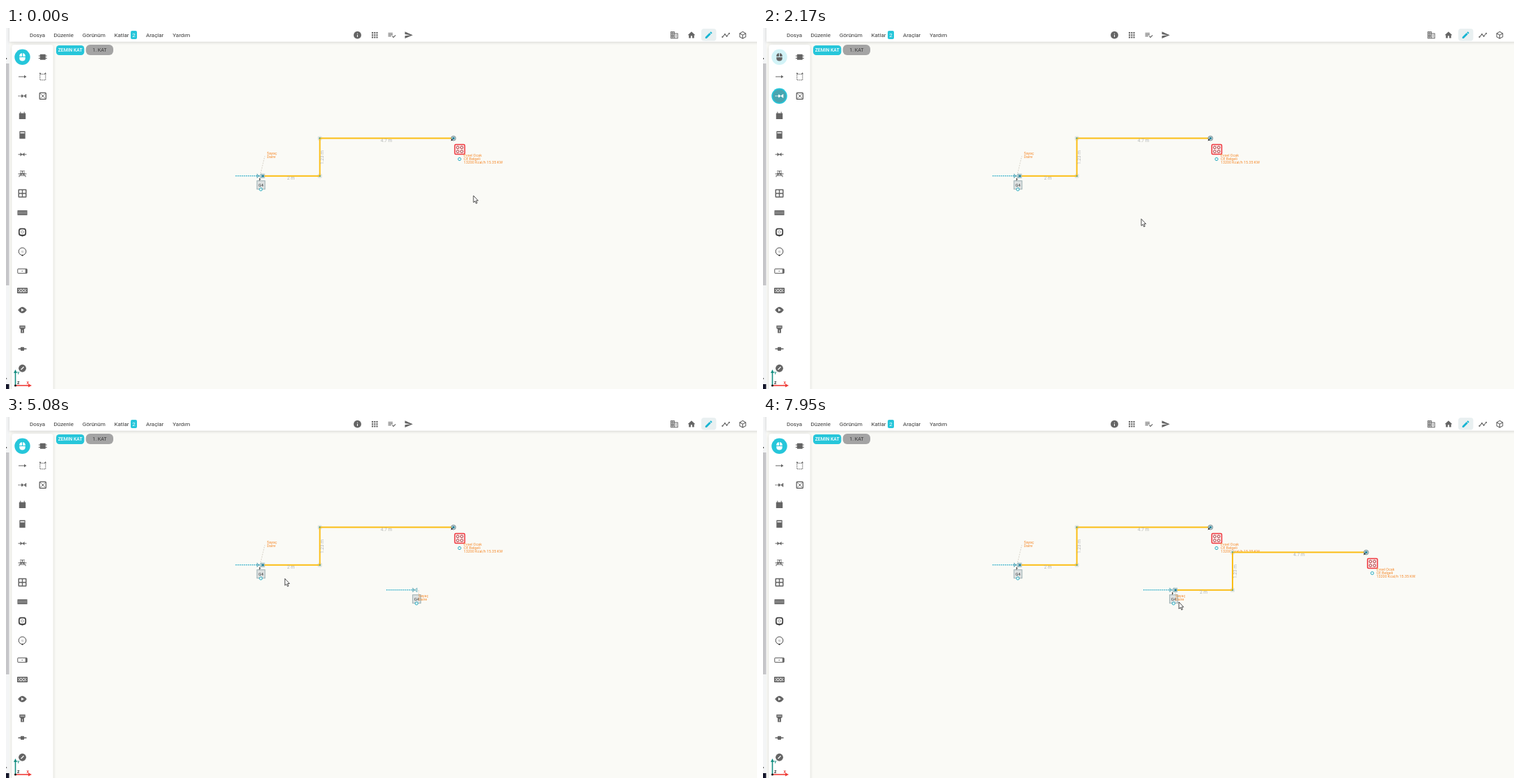
Write an HTML page that moves like this. It is 1078 px wide and 519 px high and loops after 8 s.

```html
<!DOCTYPE html>
<html lang="tr">
<head>
<meta charset="utf-8">
<title>Tesisat</title>
<style>
html, body { margin: 0; width: 100%; height: 100%; overflow: hidden; background: #fafaf6; }
svg { display: block; width: 100%; height: 100%; font-family: Roboto, sans-serif; }
.ui { fill: #383838; font-size: 8px; }
.icon { fill: #656565; color: #656565; }
.line { fill: none; stroke: currentColor; stroke-width: 1; }
.hole { fill: #fff; }
.note { fill: #f58a2c; font-size: 5.35px; }
.size { fill: #b2b5b5; font-size: 6.5px; text-anchor: middle; }
.dots { stroke: #18a5c4; stroke-width: 1.2; stroke-dasharray: 1.7 1.2; }
.ring { fill: #eafafa; stroke: #2cabc0; stroke-width: 1; }
.menu { fill: #222; font: 6.8px "Open Sans", sans-serif; }
</style>
</head>
<body>
<svg id="stage" viewBox="0 0 1078 519">
  <defs>
    <filter id="shadow" x="-20%" y="-20%" width="140%" height="140%">
      <feDropShadow dx="0" dy="1" stdDeviation="2.2" flood-opacity=".17"/>
    </filter>
    <filter id="menuShadow" x="-10%" y="-10%" width="125%" height="130%">
      <feDropShadow dx="1.5" dy="1.5" stdDeviation="1" flood-opacity=".4"/>
    </filter>
  </defs>
</svg>
<script>
const CYAN = '#26c6da', GREY = '#656565';
const stage = document.getElementById('stage');
const at = (x, y, body, extra = '') => `<g transform="translate(${x} ${y})" ${extra}>${body}</g>`;
const text = (x, y, body, cls = 'ui', extra = '') => `<text x="${x}" y="${y}" class="${cls}" ${extra}>${body}</text>`;
const rect = (x, y, w, h, extra = '') => `<rect x="${x}" y="${y}" width="${w}" height="${h}" ${extra}/>`;
const circle = (x, y, r, extra = '') => `<circle cx="${x}" cy="${y}" r="${r}" ${extra}/>`;
const path = (d, extra = '') => `<path d="${d}" ${extra}/>`;
const line = (d, extra = '') => path(d, `class="line" ${extra}`);
const grid = (steps, draw) => steps.flatMap(y => steps.map(x => draw(x, y))).join('');

// Icons on a 24 unit square, shown 13 px wide
const glyph = (x, y, body) =>
  `<g class="icon" transform="translate(${x - 6.5} ${y - 6.5}) scale(.54)">${body}</g>`;

const header =
  rect(5, -6, 1080, 25.5, 'fill="#fff" filter="url(#shadow)"') +
  [[34, 'Dosya'], [68.5, 'Düzenle'], [109.7, 'Görünüm'], [155.5, 'Katlar'], [201, 'Araçlar'], [239.3, 'Yardım']]
    .map(([x, label]) => text(x, 12.6, label)).join('') +
  rect(179, 4, 9, 12, `rx="2" fill="${CYAN}"`) +
  text(183.5, 12.8, '2', 'ui', 'style="fill:#fff" text-anchor="middle"') +
  rect(998, 1, 21.5, 17.5, 'rx="4" fill="#e9f0f1"') +
  glyph(504.5, 10.2, path('M12 2a10 10 0 1 0 .01 0zM11 7h2v2h-2zm0 4h2v6h-2z', 'fill-rule="evenodd"')) +
  glyph(529.3, 10.2, grid([4, 10, 16], (x, y) => rect(x, y, 4, 4))) +
  glyph(554, 10.2, path('M2 6h12v2H2zM2 10h12v2H2zM2 14h8v2H2zM21 11.5l1.5 1.5-6.5 6.5-4-4 1.5-1.5 2.5 2.5z')) +
  glyph(578, 10.2, path('M2 21L23 12 2 3v7l15 2-15 2z')) +
  glyph(959.3, 10.2, line('M3 20.5V3.5h9v17zM12 8h9v12.5H3M3 7.5h9M3 12h9M3 16h9M7.5 3v17M15 12h3M15 16h3', 'style="stroke-width:1.9"')) +
  glyph(984, 10.2, path('M10 20v-6h4v6h5v-8h3L12 3 2 12h3v8z')) +
  glyph(1008.7, 10.2, path('M3 17.3V21h3.8L17.8 9.9l-3.7-3.7zM20.7 7q.6-.7 0-1.4l-2.3-2.3q-.7-.6-1.4 0l-1.9 1.8 3.8 3.8z', 'fill="#16b5d2"')) +
  glyph(1033.3, 10.2, line('M3 17l6.5-7 5 5L21 7.5', 'style="stroke-width:2"') +
    [[3, 17], [9.5, 10], [14.5, 15], [21, 7.5]].map(([x, y]) => circle(x, y, 2)).join('')) +
  glyph(1057.5, 10.2, line('M12 3l8 4.5v9L12 21l-8-4.5v-9zM4 7.5l8 4.5 8-4.5M12 12v9', 'style="stroke-width:2"'));

const chips =
  rect(72, 25, 40.3, 14, `rx="4.5" fill="${CYAN}"`) +
  text(92.2, 34.2, 'ZEMIN KAT', 'ui', 'style="fill:#fff;font-size:6.8px;font-weight:500" text-anchor="middle"') +
  rect(114.7, 24, 39.3, 15, 'rx="6" fill="#a4a4a4"') +
  text(134.4, 34.2, '1. KAT', 'ui', 'style="font-size:7px" text-anchor="middle"');

const bowTie = 'M-3 -2.7L3 2.7V-2.7L-3 2.7z';
const mouseIcon = path('M-.5 -5.6V-.7H-4.2V-2Q-4 -5.2 -.5 -5.6zM.5 -5.6V-.7H4.2V-2Q4 -5.2 .5 -5.6zM-4.2 .3H4.2V2Q4 5.8 0 5.8T-4.2 2z');
const branchIcon = line('M-6 0h2.2M-3 0h2') + at(2, 0, path(bowTie)) + line('M5.3 -2.6v5.2M-1.2 -1.5v3');
const tools = [
  line('M-5.5 0H4') + path('M2.5 -2.2L6 0 2.5 2.2z'),
  '',
  path('M-4.7 -3.5h1.5v-2h1v2h4.4v-2h1v2h1.5V5H-4.7z'),
  rect(-4.2, -5.5, 8.4, 11, 'rx=".6"') + rect(-3, -4, 6, 1.6, 'class="hole"'),
  line('M-6 0H6') + path(bowTie),
  line('M-6 0H6M0 0v-4M-3.5 -4h7M-4.5 4.5v-2.2h9v2.2') + path(bowTie),
  rect(-6, -6, 12, 12, 'rx="1"') + grid([-4.5, .7], (x, y) => rect(x, y, 3.8, 3.8, 'rx=".5" class="hole"')),
  rect(-7, -3.5, 14, 7) + line('M-5 -2v4M-3 -2v4M-1 -2v4M1 -2v4M3 -2v4M5 -2v4', 'style="stroke:#bbb;stroke-width:.7"'),
  rect(-4.7, -5, 9.4, 9.4, 'rx="3" fill="none" stroke="#444" stroke-width="1.8"') +
    circle(0, -.3, 1.8, 'fill="none" stroke="#666" stroke-width=".7"') + rect(-1.2, 4, 2.4, 2, 'fill="#444"'),
  circle(0, -.3, 5.3, 'fill="none" stroke="#444" stroke-width="1"') +
    text(0, 1.2, 'G', '', 'font-size="4" text-anchor="middle"') + circle(0, 5.4, 1.1, 'fill="#444"'),
  rect(-6.7, -3.2, 13.4, 6.4, 'rx=".7" fill="none" stroke="#555"') + rect(4.3, -3, 2.2, 6) + circle(-.3, 0, .8),
  rect(-6.7, -3.2, 13.4, 6.4, 'fill="none" stroke="#333" stroke-width="1.2"') +
    [-4, 0, 4].map(x => circle(x, 0, 1.6, 'fill="none" stroke="#333"')).join(''),
  path('M-6.3 0Q-3 -4.5 0 -4.5T6.3 0Q3 4.5 0 4.5T-6.3 0z') + path('M-1.5 -2.2L2.5 0 -1.5 2.2z', 'class="hole"'),
  path('M-4.2 -5.5h8.4v4l-1.8 1.2v5.5h-4.8v-5.5L-4.2 -1.5z') + line('M-3 -3.3h6M0 1v3', 'style="stroke:#ddd"'),
  line('M-6 0H6', 'style="stroke-width:1.6"') + rect(-2.6, -2.6, 5.2, 5.2, 'rx="1"'),
  circle(0, 0, 5.4) + line('M-2 2L2 -2', 'style="stroke:#fff;stroke-width:1.2"')
];
const selectTools = [
  rect(-4, -4, 8, 8, 'rx=".6"') + line('M-6 -1.7H6M-6 1.7H6'),
  rect(-4, -3.5, 8, 8.5, 'fill="none" stroke="#555" stroke-dasharray="1.5 1"') + path('M-4 -6l2 2.5h-3zM4 -6l1 2.5h-3z'),
  rect(-4.6, -4.6, 9.2, 9.2, 'rx="1" fill="none" stroke="#555" stroke-width="1.2"') +
    line('M-3.5 -3.5l2 2M3.5 -3.5l-2 2M-3.5 3.5l2 -2M3.5 3.5l-2 -2') + circle(0, 0, 1.3)
];

const sidebar =
  rect(8.5, 24, 59, 510, 'rx="4" fill="#fff" filter="url(#shadow)"') +
  at(23.5, 41.8, circle(0, 0, 11.2, `id="mouseDisc" fill="${CYAN}"`) + at(0, 0, mouseIcon, 'id="mouseIcon"')) +
  at(23.5, 97.8, circle(0, 0, 11.2, `id="branchDisc" fill="${CYAN}"`) +
    circle(0, 0, 9.6, 'id="ripple" fill="#777"') + at(0, 0, branchIcon, 'id="branchIcon"')) +
  tools.map((body, i) => at(23.5, 70 + i * 27.95, body, 'class="icon"')).join('') +
  selectTools.map((body, i) => at(52.8, 41.8 + i * 28, body, 'class="icon"')).join('');

const edge =
  rect(0, 0, 5, 519, 'fill="#f4f5f6"') + rect(0, 51, 4.5, 319, 'fill="#c6c6c9"') +
  rect(0, 43, 1.2, 2, 'fill="#555"') + rect(0, 503, 1.2, 2, 'fill="#777"') + rect(0, 512, 4.5, 7, 'fill="#15172b"');

const axes =
  path('M13.5 514V494', 'stroke="#168f82" stroke-width="1.6"') + path('M11 496l2.5-5 2.5 5z', 'fill="#168f82"') +
  path('M13.5 514H33', 'stroke="#ef3b36" stroke-width="1.6"') + path('M32 511.5l5 2.5-5 2.5z', 'fill="#ef3b36"') +
  circle(13.5, 514, 1.6, 'fill="#222"') +
  [[16, 498, 'Y', '#168f82'], [16, 511.5, 'Z', '#222'], [29.5, 511.5, 'X', '#ef3b36']]
    .map(([x, y, name, color]) => text(x, y, name, '', `fill="${color}" font-size="5.5" font-weight="700"`)).join('');

const joint = (x, y) => rect(x - 3, y - 3, 6, 6, 'rx="1.5" fill="#d5dcdd" opacity=".75"') + circle(x, y, 1.2, 'fill="#159dbb"');
const pipe =
  joint(450.5, 158.5) + joint(450.5, 212.7) +
  path('M369 212.7H450.5V158.5H642', 'fill="none" stroke="#fbbd14" stroke-width="2"') +
  circle(450.5, 158.5, .8, 'fill="#159dbb"') + circle(450.5, 212.7, .8, 'fill="#159dbb"') +
  rect(365.5, 209.5, 6, 6.5, 'fill="#9fbcc2" opacity=".8"') + circle(368.7, 212.7, 1.5, 'fill="#137e98"') +
  path('M363.5 220l.3-5 1.6 2.5z', 'fill="#333"') +
  text(409, 218, '2 m', 'size') + text(546, 163.7, '4.7 m', 'size') +
  text(0, 0, '1.23 m', 'size', 'transform="translate(456 186) rotate(-90)"') +
  circle(642.3, 158.6, 3.4, 'fill="#b9c9cc" stroke="#6e8b93" stroke-width=".8"') + circle(642.3, 158.6, 1.5, 'fill="#137e98"') +
  path('M638.5 162.5l1.2-3.4 2 2z', 'fill="#333"') +
  rect(644.2, 167.6, 14.3, 14, 'rx="1.5" fill="#fde3e2" stroke="#ee3a41" stroke-width="1.5"') +
  at(651.3, 174.6, grid([-2.9, 2.9], (x, y) => circle(x, y, 1.8, 'fill="#fff" stroke="#a52a30" stroke-width="1"'))) +
  circle(651, 188.5, 2.1, 'class="ring"') +
  ['Evsel Ocak', 'CE Belgeli', '13200 Kcal/h 15.35 KW'].map((s, i) => text(657, 185 + i * 5, s, 'note')).join('');

const meter =
  at(363.4, 212.7, line('M-3 -3v6M3 -3v6M-2.5 -2.2L2.5 2.2M-2.5 2.2L2.5 -2.2', 'style="stroke:#4fa0b0;stroke-width:.9"')) +
  rect(360.2, 219.7, 11.6, 12, 'fill="#dde1e1" stroke="#9db0b3" stroke-width="1"') +
  text(366, 228.2, 'G4', 'ui', 'style="font-size:6.2px" text-anchor="middle"') +
  circle(365.8, 232, 2.1, 'class="ring"');
const meterLabel = (x, y) => text(x, y, 'Sayaç', 'note') + text(x, y + 5, 'Daire', 'note');
const leader = d => path(d, 'fill="none" stroke="#cfc8bb" stroke-width=".8" stroke-dasharray="2 1.5"');

const drawing =
  path('M329.5 212.7H363', 'class="dots"') + leader('M365.5 209L371.5 184') + meter + meterLabel(374.5, 182) + pipe +
  `<g id="added">${path('', 'id="addedLine" class="dots"')}<g id="addedMeter">` +
  at(223.5, 36, meter) + leader('M592.5 249v8') + meterLabel(592, 259.3) + '</g></g>' +
  at(223.5, 36, pipe, 'id="pasted"');

const overlay =
  `<g id="tooltip">${rect(42, 91.7, 42.3, 10.6, 'rx="2" fill="#616161" opacity=".96"')}` +
  text(63.2, 98.9, 'Branşman Ekle', '', 'fill="#fff" font-size="5.2" font-weight="500" text-anchor="middle"') + '</g>' +
  `<g id="menu">${rect(366.6, 225.8, 92, 41, 'fill="#f1f1f1" stroke="#a3a3a3" stroke-width=".8" filter="url(#menuShadow)"')}` +
  rect(368, 228.5, 89, 12.2, 'id="hover" fill="#91c9f7"') +
  ['Tesisatı kopyala', 'Tesisatı kes', 'Tesisatı sil'].map((s, i) => text(386.7, 236.7 + i * 12.3, s, 'menu')).join('') + '</g>' +
  path('M0 0V9.8L2.2 7.8 3.8 11.3 5.3 10.6 3.8 7.2H6.7z', 'id="arrow" fill="#fff" stroke="#222" stroke-width=".8"') +
  path('M-1 1Q0 -.4 1 1V5Q2.3 4.2 2.8 5.4 4.2 4.8 4.5 6 6 5.6 6 7.2V10L4.8 13.5H-1L-4.3 8.5Q-3.8 7 -1 9z',
    'id="hand" fill="#fff" stroke="#222" stroke-width=".9" stroke-linejoin="round"');

stage.insertAdjacentHTML('beforeend', edge + drawing + header + chips + sidebar + axes + overlay);
const el = Object.fromEntries([...stage.querySelectorAll('[id]')].map(node => [node.id, node]));

// Rows of time and values
const cursorTrack = [
  [0, 671, 241], [430, 671, 241], [520, 664, 243], [1210, 31, 90], [1340, 25, 90], [1740, 25, 90],
  [2170, 543, 274.5], [2320, 546, 279], [2470, 541, 273], [2900, 278, 219], [3300, 542, 246],
  [3340, 546, 249], [3430, 546, 249], [4000, 582, 248], [4470, 582, 248], [5260, 373, 230],
  [5430, 366.5, 228], [6120, 366.5, 228], [6170, 373.5, 229], [6300, 394, 235], [6730, 394, 235],
  [7140, 560, 271], [7390, 590, 263.3], [7800, 590, 263.3], [7950, 597, 266], [8000, 597, 266]
];
const mouseTrack = [[0, 1], [1690, 1], [1950, .35], [2170, .21], [2470, 0], [4430, 0], [4470, .13], [4700, 1], [8000, 1]];
const branchTrack = [[0, 0], [1690, 0], [1830, 1], [4430, 1], [4470, .88], [4700, 0], [8000, 0]];
const rippleTrack = [[0, 0], [1690, 0], [1830, .45], [2170, .42], [2470, 0], [8000, 0]];
const tooltipTrack = [[0, 0], [1260, 0], [1340, 1], [1690, 1], [1790, 0], [8000, 0]];

const linear = k => k;
const smooth = k => k * k * (3 - 2 * k);
function sample(track, t, ease = linear) {
  const i = track.findIndex(row => row[0] > t);
  const a = track[i - 1], b = track[i];
  const k = ease((t - a[0]) / (b[0] - a[0]));
  return a.slice(1).map((v, n) => v + (b[n + 1] - v) * k);
}
const show = (node, on) => { node.style.display = on ? '' : 'none'; };
const fade = (node, track, t) => node.setAttribute('opacity', sample(track, t)[0]);
const paint = (node, color) => { node.style.fill = node.style.color = color; };

function render(t) {
  const [x, y] = sample(cursorTrack, t, smooth);
  const pointing = x < 64;
  for (const node of [el.arrow, el.hand]) node.setAttribute('transform', `translate(${x} ${y})`);
  show(el.hand, pointing);
  show(el.arrow, !pointing);

  const branchMode = t >= 1690 && t < 4470;
  paint(el.mouseIcon, branchMode ? GREY : '#fff');
  paint(el.branchIcon, branchMode ? '#fff' : GREY);
  fade(el.mouseDisc, mouseTrack, t);
  fade(el.branchDisc, branchTrack, t);
  fade(el.ripple, rippleTrack, t);
  fade(el.tooltip, tooltipTrack, t);

  const shift = t < 4000 ? Math.min(0, x - 582) : 0;
  show(el.added, t >= 3430);
  el.addedLine.setAttribute('d', `M546 248.7H${586.5 + shift}`);
  el.addedMeter.setAttribute('transform', `translate(${shift} 0)`);

  show(el.menu, t >= 5650 && t < 6780);
  show(el.hover, t >= 6220);
  show(el.pasted, t >= 7340);
}

const start = performance.now();
function tick() {
  render((performance.now() - start) % 8000);
  requestAnimationFrame(tick);
}
tick();
</script>
</body>
</html>
```
